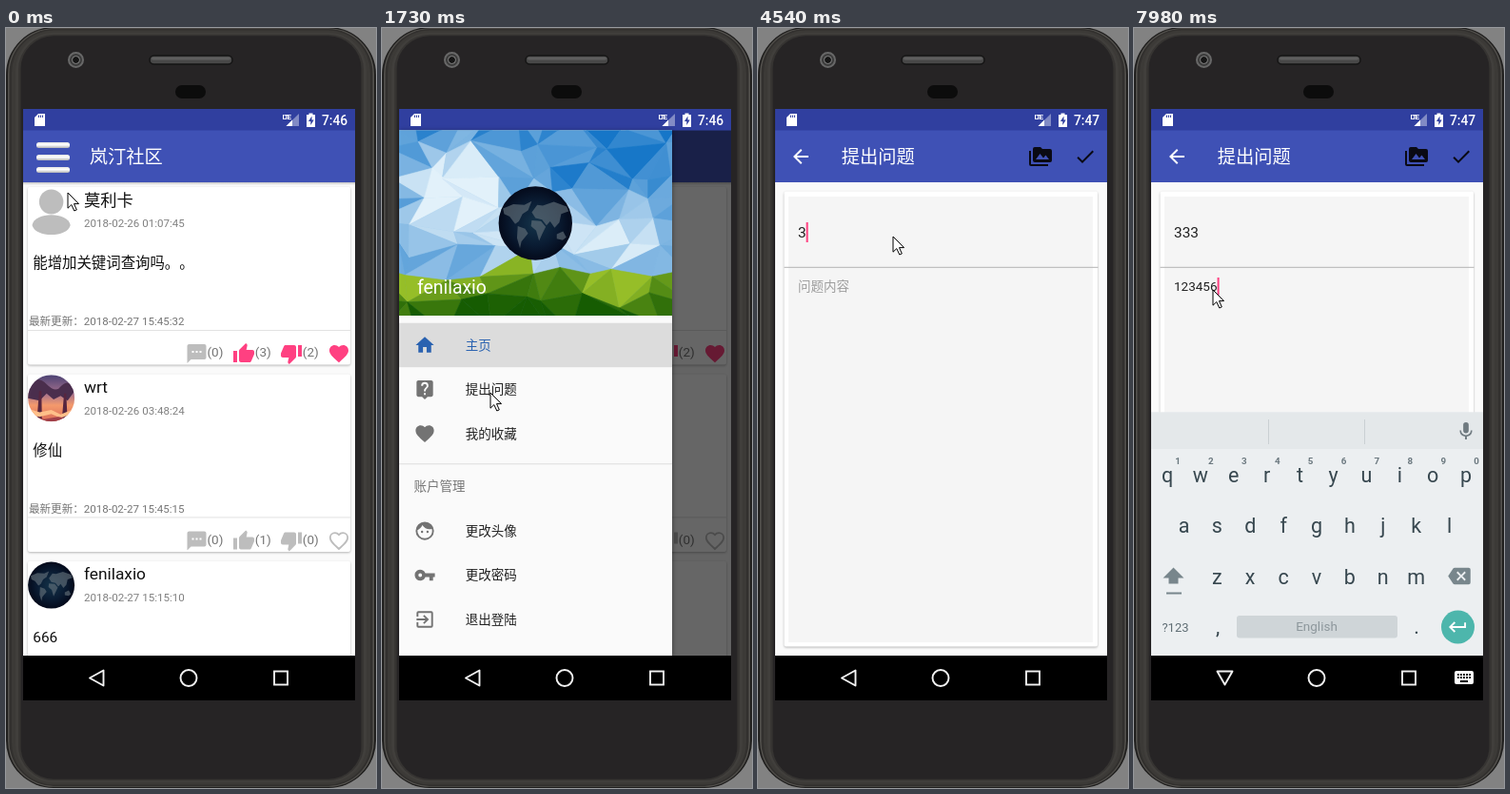
Animation of 389 by 798 pixels, one loop 8 s. Source, as an HTML page:

```html
<!DOCTYPE html>
<html lang="zh-CN">
<head>
<meta charset="utf-8">
<title>Phone demo</title>
<style>
html, body { margin: 0; width: 100%; height: 100%; overflow: hidden; background: #828282; }
svg { display: block; }
text {
  font-family: Roboto, "Noto Sans CJK SC", "Noto Sans CJK", sans-serif;
  white-space: pre; text-spacing-trim: space-all; font-feature-settings: "chws" 0;
}
.card { fill: #fff; filter: drop-shadow(0 1px 1px rgba(0,0,0,.28)); }
.mid { text-anchor: middle; }
.line { fill: none; stroke: #f2f2f2; stroke-width: 1.9; }
</style>
</head>
<body>
<svg id="stage" width="389" height="798" viewBox="0 0 389 798">
  <defs>
    <clipPath id="screenClip"><rect x="18" y="85" width="349" height="621"/></clipPath>
    <clipPath id="appClip"><rect x="18" y="85" width="349" height="574"/></clipPath>
    <clipPath id="headClip"><rect x="18" y="107.5" width="287" height="194.5"/></clipPath>
    <clipPath id="disc"><circle r="1"/></clipPath>
    <linearGradient id="bar" x2="0" y2="1">
      <stop offset="0" stop-color="#e4e4e4"/><stop offset=".45" stop-color="#fff"/><stop offset="1" stop-color="#b4b4b4"/>
    </linearGradient>
    <linearGradient id="dusk" x2="0" y2="1">
      <stop offset="0" stop-color="#4b4273"/><stop offset=".4" stop-color="#a3708d"/>
      <stop offset=".65" stop-color="#f49a6c"/><stop offset="1" stop-color="#d96a57"/>
    </linearGradient>
    <linearGradient id="shade" x2="0" y2="1">
      <stop offset="0" stop-opacity=".22"/><stop offset="1" stop-opacity="0"/>
    </linearGradient>
    <radialGradient id="night">
      <stop offset="0" stop-color="#143349"/><stop offset=".6" stop-color="#0a1c33"/><stop offset="1" stop-color="#040a1b"/>
    </radialGradient>
  </defs>

  <rect width="389" height="798" fill="#828282"/>
  <g id="shell"></g>
  <circle cx="73.5" cy="33.5" r="7.5" fill="#3b3b3b" stroke="#686868" stroke-width="2"/>
  <circle cx="73.5" cy="33.5" r="4" fill="#161616" stroke="#8a8a8a"/>
  <rect x="151" y="29" width="87" height="9" rx="4.5" fill="#484848" stroke="#151515" stroke-width="1.5"/>
  <rect x="153" y="30.5" width="83" height="3" rx="1.5" fill="#5e5e5e"/>
  <rect x="178" y="60" width="32" height="14" rx="7" fill="#0c0c0c"/>

  <g clip-path="url(#screenClip)">
    <rect x="18" y="659" width="350" height="47"/>
    <g clip-path="url(#appClip)">
      <g id="feed"></g>
      <rect id="dim" x="18" y="107.5" width="350" height="552"/>
      <g id="drawer"></g>
    </g>
    <g id="form"></g>
    <g clip-path="url(#appClip)"><g id="board"></g></g>
    <g id="system"></g>
  </g>
  <path id="pointer" d="M0 0V16.2L3.8 12.6 6.8 19 9.3 17.9 6.5 11.6H11.5Z" fill="#fff" stroke="#000"/>
</svg>

<script>
const $ = id => document.getElementById(id);
const LOOP = 8000;
const GREY = '#bdbdbd', PINK = '#ff4081', INK = '#212121', SOFT = '#757575';

const ICONS = {
  chat: 'M20 2H4c-1.1 0-2 .9-2 2v18l4-4h14c1.1 0 2-.9 2-2V4c0-1.1-.9-2-2-2zM9 11H7V9h2v2zm4 0h-2V9h2v2zm4 0h-2V9h2v2z',
  up: 'M1 21h4V9H1v12zm22-11c0-1.1-.9-2-2-2h-6.31l.95-4.57.03-.32c0-.41-.17-.79-.44-1.06L14.17 1 7.59 7.59C7.22 7.95 7 8.45 7 9v10c0 1.1.9 2 2 2h9c.83 0 1.54-.5 1.84-1.22l3.02-7.05c.09-.23.14-.47.14-.73v-2z',
  heart: 'M12 21.35l-1.45-1.32C5.4 15.36 2 12.28 2 8.5 2 5.42 4.42 3 7.5 3c1.74 0 3.41.81 4.5 2.09C13.09 3.81 14.76 3 16.5 3 19.58 3 22 5.42 22 8.5c0 3.78-3.4 6.86-8.55 11.54L12 21.35z',
  home: 'M10 20v-6h4v6h5v-8h3L12 3 2 12h3v8z',
  help: 'M19 2H5c-1.1 0-2 .9-2 2v14c0 1.1.9 2 2 2h4l3 3 3-3h4c1.1 0 2-.9 2-2V4c0-1.1-.9-2-2-2zm-6 16h-2v-2h2v2zm2-7.7l-.9.9c-.7.8-1.1 1.4-1.1 2.8h-2v-.5c0-1.1.4-2.1 1.2-2.8l1.2-1.3c.4-.4.6-.9.6-1.4a2 2 0 0 0-4 0H8a4 4 0 0 1 8 0c0 .9-.4 1.7-1 2.3z',
  face: 'M9 11.75a1.25 1.25 0 1 0 0 2.5 1.25 1.25 0 0 0 0-2.5zm6 0a1.25 1.25 0 1 0 0 2.5 1.25 1.25 0 0 0 0-2.5zM12 2a10 10 0 1 0 0 20 10 10 0 0 0 0-20zm0 18a8 8 0 0 1-8-8.9c2.4-1 4.3-3 5.3-5.4a10 10 0 0 0 10.4 4.1A8 8 0 0 1 12 20z',
  key: 'M12.65 10a6 6 0 1 0 0 4H17v4h4v-4h2v-4zM7 14a2 2 0 1 1 0-4 2 2 0 0 1 0 4z',
  exit: 'M10.1 15.6L11.5 17l5-5-5-5-1.4 1.4L12.7 11H3v2h9.7zM19 3H5a2 2 0 0 0-2 2v4h2V5h14v14H5v-4H3v4a2 2 0 0 0 2 2h14a2 2 0 0 0 2-2V5a2 2 0 0 0-2-2z',
  back: 'M20 11H7.83l5.59-5.59L12 4l-8 8 8 8 1.41-1.41L7.83 13H20z',
  media: 'M2 6H0v14a2 2 0 0 0 2 2h18v-2H2zm20-2h-8l-2-2H6a2 2 0 0 0-2 2v12a2 2 0 0 0 2 2h16a2 2 0 0 0 2-2V6a2 2 0 0 0-2-2zM7 15l4.5-6 3.5 4.5 2.5-3L21 15z',
  done: 'M9 16.17L4.83 12l-1.42 1.41L9 19 21 7l-1.41-1.41z',
  mic: 'M12 14a3 3 0 0 0 3-3V5a3 3 0 0 0-6 0v6a3 3 0 0 0 3 3zm5.3-3a5.3 5.3 0 0 1-10.6 0H5a7 7 0 0 0 6 6.7V21h2v-3.3A7 7 0 0 0 19 11z',
  shift: 'M12 3L1 14h6v6h10v-6h6z',
  erase: 'M22 3H7c-.7 0-1.2.4-1.6.9L0 12l5.4 8.1c.4.5.9.9 1.6.9h15a2 2 0 0 0 2-2V5a2 2 0 0 0-2-2zm-3 12.6L17.6 17 14 13.4 10.4 17 9 15.6l3.6-3.6L9 8.4 10.4 7l3.6 3.6L17.6 7 19 8.4 15.4 12z',
  enter: 'M19 7v4H5.83l3.58-3.59L8 6l-6 6 6 6 1.41-1.41L5.83 13H21V7z',
  board: 'M20 5H4a2 2 0 0 0-2 2v10a2 2 0 0 0 2 2h16a2 2 0 0 0 2-2V7a2 2 0 0 0-2-2zm-9 3h2v2h-2zm0 3h2v2h-2zM8 8h2v2H8zm0 3h2v2H8zm-1 2H5v-2h2zm0-3H5V8h2zm9 7H8v-2h8zm0-4h-2v-2h2zm0-3h-2V8h2zm3 3h-2v-2h2zm0-3h-2V8h2z'
};

const label = (x, y, size, str, fill = INK, more = '') =>
  `<text x="${x}" y="${y}" font-size="${size}" fill="${fill}" ${more}>${str}</text>`;
const box = (x, y, w, h, fill, more = '') =>
  `<rect x="${x}" y="${y}" width="${w}" height="${h}" fill="${fill}" ${more}/>`;
// icon centred on x, y
const icon = (name, x, y, fill, scale = 1, more = '') =>
  `<path transform="translate(${x} ${y}) scale(${scale}) translate(-12 -12)" d="${ICONS[name]}" fill="${fill}" ${more}/>`;

// --- phone shell: nested outlines, inset and colour ---
$('shell').innerHTML = [[0, '#1f1e1d'], [2, '#55534f'], [3.5, '#32302e'], [6, '#3c3a37'], [10, '#413f3c'],
  [13, '#363432'], [15.5, '#262425']].map(([d, fill]) =>
  box(d, d * .6 - 1, 389 - 2 * d, 799 - d * 1.2, fill, `rx="${50 - d}"`)).join('');

// --- avatars, drawn in a unit circle ---
const AVATARS = {
  blank: `<ellipse cy="-.4" rx=".52" ry=".53" fill="${GREY}"/>
    <path d="M-.82 .6C-.72 .02 .72 .02 .82 .6 .7 1.15-.7 1.15-.82 .6Z" fill="${GREY}"/>`,
  dusk: `<g clip-path="url(#disc)"><rect x="-1" y="-1" width="2" height="2" fill="url(#dusk)"/>
    <path d="M-1-.6Q-.6-1-.2-.6T.4-.5Q.8-.9 1-.3L.7 .1 .4-.1 .1 .05-.2-.2-.5 .1-1 0Z" fill="#4a2e4d"/>
    <path d="M-.62 1-.52-.3h.1L-.4 1ZM.45 1 .55-.2h.09L.7 1Z" fill="#57263f"/>
    <path d="M-1 .45-.5 .6 0 .5 .4 .7 1 .45V.62L.4 .85 0 .68-.5 .8-1 .7Z" fill="#ffc08a"/>
    <path d="M-1 .72-.3 .9 .3 .8 1 .9V1H-1Z" fill="#a0404a"/></g>`,
  globe: `<circle r="1" fill="url(#night)"/><g fill="#66737c" opacity=".62">
    <path d="M-.88-.4-.6-.52-.3-.5-.1-.6-.2-.35-.35-.25-.45-.05-.55 .02-.7-.18-.85-.25Z"/>
    <path d="M-.48 .08-.28 .15-.2 .28-.38 .5-.42 .68-.5 .4Z"/>
    <path d="M-.1-.3 .05-.5 .2-.48 .5-.58 .85-.45 .9-.32 .7-.25 .65-.02 .52 .12 .4-.05 .3 .06 .18-.1 0-.14Z"/>
    <path d="M-.1-.08 .15-.06 .28 .1 .18 .3 .1 .48 .02 .2-.12 .08Z"/>
    <path d="M.58 .3 .75 .22 .84 .38 .74 .46 .58 .42Z"/></g>`
};
const avatar = (kind, x, y, r) => `<g transform="translate(${x} ${y}) scale(${r})">${AVATARS[kind]}</g>`;

// --- feed ---
function post(i, kind, name, made, body, edited, up, down, marked) {
  const tint = marked ? PINK : GREY;
  const count = (x, n) => label(x, 345.2, 13.5, `(${n})`, SOFT);
  return `<g transform="translate(0 ${i * 196.4})">
    <rect class="card" x="23" y="167" width="339" height="186.5" rx="2"/>
    ${avatar(kind, 47.6, 192.3, 24.5)}
    ${label(82, 186.5, 17.3, name, '#111')}
    ${label(82, 209.2, 11.55, made, '#808080')}
    ${label(28.3, 252.2, 15.4, body, '#111')}
    ${label(24, 312.2, 11.55, '最新更新：' + edited, SOFT)}
    ${box(23, 317, 339, 1, '#e2e2e2')}
    ${icon('chat', 200.5, 342, GREY)}${count(211.5, 0)}
    ${icon('up', 250, 342, tint)}${count(261.8, up)}
    ${icon('up', 300, 342, tint, -1)}${count(311.8, down)}
    ${marked ? icon('heart', 350, 342, PINK) : icon('heart', 350, 342, 'none', .92, `stroke="${GREY}" stroke-width="2"`)}
  </g>`;
}

const topBar = title => box(18, 85, 350, 23, '#303f9f') +
  box(18, 107.5, 350, 54.5, '#3f51b5') + label(87.7, 141.7, 19.25, title, '#fff');

$('feed').innerHTML = box(18, 85, 350, 574, '#fafafa') + topBar('岚汀社区') + box(18, 162, 350, 3, 'url(#shade)') +
  [120, 133, 146].map(y => box(32, y, 35, 6, 'url(#bar)', 'rx="2.5"')).join('') +
  post(0, 'blank', '莫利卡', '2018-02-26 01:07:45', '能增加关键词查询吗。。', '2018-02-27 15:45:32', 3, 2, true) +
  post(1, 'dusk', 'wrt', '2018-02-26 03:48:24', '修仙', '2018-02-27 15:45:15', 1, 0, false) +
  post(2, 'globe', 'fenilaxio', '2018-02-27 15:15:10', '666', '2018-02-27 15:15:10', 0, 0, false);

// --- drawer ---
function lowPoly() {
  let seed = 11;
  const rnd = () => (seed = (seed * 16807) % 2147483647) / 2147483647;
  const mix = (a, b, k) => a.map((v, i) => Math.round(v + (b[i] - v) * Math.max(0, Math.min(1, k))));
  const spot = (u, v, x, y, w, h) => Math.exp(-(((u - x) / w) ** 2 + ((v - y) / h) ** 2));
  const cols = 9, rows = 8, pts = [];
  for (let r = 0; r <= rows; r++) for (let c = 0; c <= cols; c++)
    pts.push([(c + (rnd() - .5) * .9) / cols * 1.1 - .05, (r + (rnd() - .5) * .8) / rows * 1.1 - .05]);
  // pale streak falls from the upper left to the skyline, grass darkens downward
  const tint = (u, v) => {
    const edge = .75 + .05 * Math.sin(u * 8 + 1);
    if (v > edge) return mix([150, 190, 40], [22, 92, 2], (v - edge) * 4.5 + (rnd() - .5) * .45);
    const pale = .85 * spot(u, v, .2, .3, .2, .25) + .55 * spot(u, v, .5, .55, .3, .2) + .45 * spot(u, v, .85, .6, .2, .25);
    return mix([22, 118, 200], [226, 241, 250], pale + .12 + v * .25 + (rnd() - .5) * .4);
  };
  let out = '';
  const tri = (...ids) => {
    const p = ids.map(i => pts[i]);
    const mean = k => (p[0][k] + p[1][k] + p[2][k]) / 3;
    const fill = `rgb(${tint(mean(0), mean(1))})`;
    const d = p.map(([u, v]) => `${(18 + u * 287).toFixed(1)},${(108 + v * 194).toFixed(1)}`).join(' ');
    out += `<polygon points="${d}" fill="${fill}" stroke="${fill}" stroke-width=".6"/>`;
  };
  for (let r = 0; r < rows; r++) for (let c = 0; c < cols; c++) {
    const a = r * (cols + 1) + c, b = a + cols + 1;
    if (rnd() < .5) { tri(a, a + 1, b); tri(a + 1, b + 1, b); }
    else { tri(a, a + 1, b + 1); tri(a, b + 1, b); }
  }
  return `<g clip-path="url(#headClip)">${box(18, 107, 287, 195, '#6db4e4')}${out}</g>`;
}

const MENU = [['home', '主页', 333.5], ['help', '提出问题', 380], ['heart', '我的收藏', 426.5],
  ['face', '更改头像', 528.5], ['key', '更改密码', 575], ['exit', '退出登陆', 621.5]];
$('drawer').innerHTML =
  box(18, 107.5, 287, 552, '#fafafa', 'style="filter:drop-shadow(1px 0 2px rgba(0,0,0,.3))"') + lowPoly() +
  avatar('globe', 161.3, 205, 38.7) + label(37, 279, 19.4, 'fenilaxio', '#fff') +
  box(18, 309.7, 287, 46.5, '#dcdcdc') + box(18, 457.3, 287, 1, '#dcdcdc') +
  label(33.5, 486.2, 13.5, '账户管理', SOFT) +
  MENU.map(([name, str, y], i) => icon(name, 45, y - .5, i ? '#737373' : '#2a62b0', .9625) +
    label(87.8, y + 4.2, 13.5, str, i ? INK : '#2a62b0')).join('');

// --- question form ---
$('form').innerHTML = box(18, 85, 350, 574, '#fafafa') + topBar('提出问题') + icon('back', 45, 135, '#fff') +
  `<g id="actions">${icon('media', 297, 135, '#0a0a14')}${icon('done', 344, 135, '#0a0a14')}</g>` +
  '<rect class="card" x="27.5" y="171.5" width="329.5" height="478" rx="2"/>' +
  box(32, 177, 320, 468, '#f5f5f5') + box(27.5, 250.8, 330, 1, '#b2b2b2') +
  label(42, 219.9, 15.4, '', INK, 'id="subject"') + label(42, 275.7, 13.5, '', INK, 'id="detail"') +
  box(42, 204, 2, 21, PINK, 'id="caret"');

// --- keyboard ---
const key = (x, y, ch) => label(x, y, 21.5, ch, '#37474f', 'class="mid"');
const row = (chars, x, y) => [...chars].map((ch, i) => key(x + i * 34.9, y, ch)).join('');
$('board').innerHTML = box(18, 403.5, 350, 256, '#eceff1') + box(18, 403.5, 350, 38.5, '#e4e8ea') +
  box(141, 411, 1, 26, '#cad0d3') + box(242, 411, 1, 26, '#cad0d3') + icon('mic', 349, 423.5, '#6f7a80', .95) +
  row('qwertyuiop', 35, 477) + row('asdfghjkl', 52.5, 530) + row('zxcvbnm', 87.3, 583.5) +
  [...'1234567890'].map((n, i) =>
    label(46 + i * 34.9, 457.5, 9.8, n, '#6b787f', 'class="mid" font-weight="700"')).join('') +
  icon('shift', 41.5, 575.5, '#78868c') + box(34, 592.5, 16, 2, '#78868c') + icon('erase', 342, 575.5, '#78868c', .98) +
  label(43.5, 633.5, 13, '?123', '#5f6d74', 'class="mid"') + key(88, 636, ',') +
  box(108, 617, 169, 23.5, '#cfd5d8', 'rx="3"') + label(192, 633.3, 13.5, 'English', '#8d979c', 'class="mid"') +
  key(297, 636, '.') + '<circle cx="340.5" cy="629" r="17.5" fill="#4db6ac"/>' + icon('enter', 340.5, 629, '#fff', .95);

// --- status and navigation icons ---
$('system').innerHTML =
  '<path d="M34 90H41V103H30V94Z" fill="#fff"/><path d="M34.5 91.5v2.500M36.5 91.5v2.500M38.5 91.5v2.500" stroke="#303f9f"/>' +
  label(290.5, 96, 8, 'LTE', '#fff', 'font-weight="700" style="letter-spacing:-1.7px"') +
  '<path d="M308 90V103H294.5Z" fill="#fff" opacity=".4"/><path d="M301 96.5V103H294.5Z" fill="#fff"/>' +
  '<path d="M318.5 89.5h4v1.5h2.5v13h-9V91h2.5Z" fill="#fff"/><path d="M321.5 92.5l-3.5 5.5h2.3v4l3.4-5.5h-2.2Z" fill="#303f9f"/>' +
  label(332, 101.7, 13.8, '', '#fff', 'id="clock" font-weight="500"') +
  '<path id="goBack" class="line" stroke-linejoin="round"/>' +
  '<circle class="line" cx="192" cy="682.5" r="8.5"/><rect class="line" x="282" y="675.5" width="14" height="14"/>' +
  `<g id="ime">${icon('board', 347, 682, '#fff')}</g>`;

// --- timeline: each row holds from its time until the next ---
const POINTER = [[0, 65, 173], [170, 55, 150], [330, 47, 138], [480, 50, 141], [640, 64, 154], [790, 80, 215],
  [950, 98, 300], [1110, 111, 362], [1260, 114, 383], [1740, 122, 365], [1900, 153, 303], [2050, 156, 256],
  [2220, 153, 227], [2370, 142, 219], [5790, 125, 240], [5940, 100, 262], [6100, 85, 273], [6260, 83, 275]];
const DRAWER = [[0, -287], [480, -190], [640, -40.6], [790, 0], [1740, -130], [1900, -287]];
const FORM = [[0, 0, 0], [1900, .5, 30], [2050, .95, 5], [2220, 1, 0]];
const BOARD = [[0, 0, 256], [6430, .7, 60], [6560, 1, 0]];
// time, subject length, detail length, caret field
const TYPING = [[0, 0, 0, 1], [2370, 0, 0, 0], [3000, 0, 0, 1], [3460, 0, 0, 0], [3930, 0, 0, 1], [4390, 0, 0, 0],
  [4540, 1, 0, 1], [5020, 2, 0, 1], [5170, 3, 0, 1], [5630, 3, 0, 0], [6260, 3, 0, 2], [6730, 3, 0, 0],
  [7020, 3, 1, 2], [7180, 3, 2, 2], [7340, 3, 3, 2], [7660, 3, 4, 2], [7820, 3, 5, 2], [7980, 3, 6, 2]];

const at = (track, t) => track.findLast(step => step[0] <= t).slice(1);
const set = (id, attrs) => Object.entries(attrs).forEach(([k, v]) => $(id).setAttribute(k, v));
const move = (x, y) => `translate(${x} ${y})`;

function fillField(id, str, hint) {
  $(id).textContent = str || hint;
  set(id, { fill: str ? INK : '#9e9e9e' });
}

function draw(t) {
  set('pointer', { transform: move(...at(POINTER, t)) });

  const [slide] = at(DRAWER, t);
  set('drawer', { transform: move(slide, 0), opacity: slide > -287 ? 1 : 0 });
  set('dim', { opacity: .6 * (1 + slide / 287) });

  const [alpha, rise] = at(FORM, t);
  set('form', { opacity: alpha, transform: move(0, rise) });
  set('actions', { opacity: t < 2050 ? 0 : 1 });
  $('clock').textContent = t < 2220 ? '7:46' : '7:47';

  const [n, m, field] = at(TYPING, t);
  fillField('subject', '333'.slice(0, n), '问题标题');
  fillField('detail', '123456'.slice(0, m), '问题内容');
  const inDetail = field === 2;
  set('caret', {
    opacity: field ? 1 : 0,
    x: 42 + (inDetail ? m * 7.6 : n * 8.65),
    y: inDetail ? 262 : 204,
    height: inDetail ? 18.5 : 21
  });

  const [show, drop] = at(BOARD, t);
  set('board', { opacity: show, transform: move(0, drop) });
  set('ime', { opacity: show ? 1 : 0 });
  set('goBack', { d: show ? 'M87.5 675.5H103.5L95.5 689.5Z' : 'M102.5 674.5V690.5L88 682.5Z' });
}

function tick() {
  draw(performance.now() % LOOP);
  requestAnimationFrame(tick);
}
tick();
</script>
</body>
</html>
```
